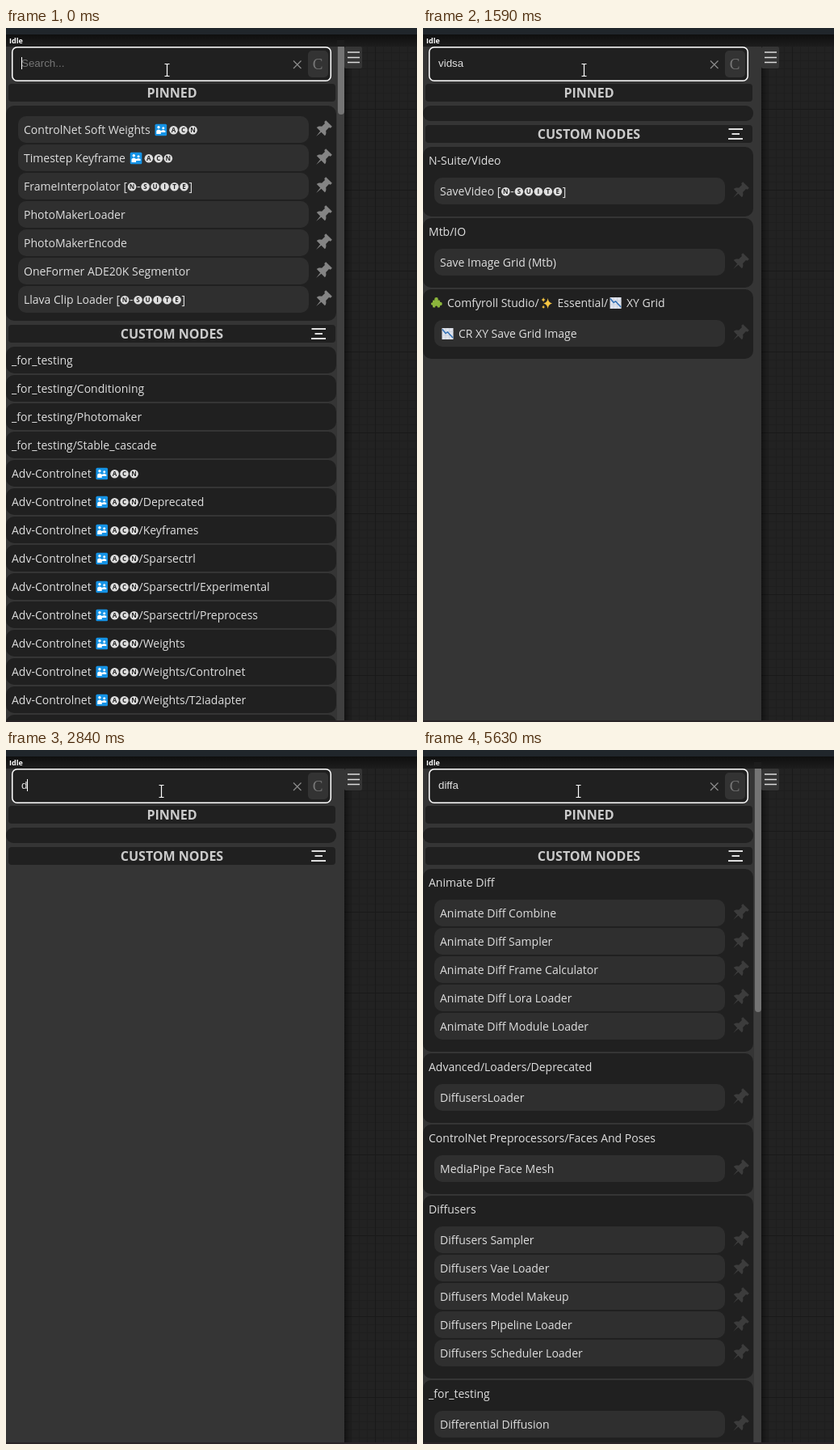
An HTML page that plays this animation: 509x858 px, repeating every 5700 ms.

```html
<!DOCTYPE html>
<html lang="en">
<head>
<meta charset="utf-8">
<title>Node search</title>
<style>
  html, body { margin: 0; width: 100%; height: 100%; overflow: hidden; background: #222; }
  svg { display: block; width: 509px; height: 858px; }
  text { white-space: pre; }
  .label { font: 14px "Open Sans", sans-serif; fill: #dedede; }
  .title { font: bold 16px "Open Sans", sans-serif; fill: #cbcbcb; text-anchor: middle; }
  .query { font: 13.333px "Liberation Sans", Arial, sans-serif; }
  .badge { font: bold 8px "Open Sans", sans-serif; fill: #222; text-anchor: middle; }
</style>
</head>
<body>
<svg viewBox="0 0 509 858">
  <defs>
    <pattern id="minor" x="7" width="10" height="10" patternUnits="userSpaceOnUse">
      <path d="M.5 0V10M0 .5H10" stroke="#1e1e1e"/>
    </pattern>
    <pattern id="major" x="57" width="100" height="100" patternUnits="userSpaceOnUse">
      <path d="M.5 0V100M0 .5H100" stroke="#191919"/>
    </pattern>
    <linearGradient id="bar" x2="0" y2="1">
      <stop stop-color="#0f0f0f"/><stop offset="1" stop-color="#1d1d1d"/>
    </linearGradient>
    <linearGradient id="shade">
      <stop stop-color="#000" stop-opacity=".45"/><stop offset="1" stop-color="#000" stop-opacity="0"/>
    </linearGradient>
    <path id="pin" transform="rotate(45) scale(.9)"
      d="M-6-11H6V-8L4-7V-1C7 1 8 3 8 5H1L0 14-1 5H-8C-8 3-7 1-4-1V-7L-6-8Z"/>
    <g id="passport">
      <rect x="-7.3" y="-7.3" width="14.6" height="14.6" rx="1.5" fill="#1593e6"/>
      <g fill="#fff">
        <circle cx="-2.8" cy="-3.2" r="1.7"/><circle cx="3" cy="-2.2" r="1.5"/>
        <path d="M-5.5 5V1Q-3-2 0 1L3 0 5.5 1V3H0V5Z"/>
      </g>
    </g>
    <g id="puzzle" fill="#8cb63c">
      <rect x="-4.5" y="-3.5" width="9" height="9" rx="1"/>
      <circle cx="0" cy="-4.6" r="2.3"/><circle cx="5" cy="1" r="2.3"/>
      <circle cx="-4.8" cy="1" r="1.8"/>
      <circle cx="0" cy="5" r="1.5" fill="#202020"/>
    </g>
    <g id="sparkle" fill="#f5c542">
      <path d="M1.5-6Q2.3-.3 7 .5 2.3 1.3 1.5 7 .7 1.3-4 .5 .7-.3 1.5-6Z"/>
      <path d="M-4-7Q-3.7-4.3-1.5-4-3.7-3.7-4-1-4.3-3.7-6.5-4-4.3-4.3-4-7ZM-4 2.5Q-3.7 4.5-2 5-3.7 5.3-4 7-4.3 5.3-6 5-4.3 4.5-4 2.5Z"/>
    </g>
    <g id="chart">
      <rect x="-7" y="-7" width="14" height="14" fill="#dfe3ec"/>
      <path d="M-7-2.5H7M-7 2H7M-2.5-7V7M2-7V7" stroke="#c3cad8" stroke-width=".7"/>
      <path d="M-6.5-5.5L-2.5-.5 0-2 6.5 5" fill="none" stroke="#2f6fb5" stroke-width="1.4"/>
    </g>
  </defs>

  <rect width="509" height="858" fill="#222"/>
  <rect x="419" width="90" height="858" fill="url(#minor)"/>
  <rect x="419" width="90" height="858" fill="url(#major)"/>
  <rect x="419" width="10" height="858" fill="url(#shade)"/>
  <rect width="509" height="8" fill="#20262b"/>
  <rect y="8" width="509" height="15" fill="url(#bar)"/>
  <text x="4" y="19" style="font:bold 9px 'Open Sans',sans-serif" fill="#fff">Idle</text>

  <rect y="23" width="419" height="835" fill="#353535"/>
  <rect x="419" y="23" width="22" height="27" rx="2" fill="#353535"/>
  <path d="M423 30H438M423 36.5H438M423 42.5H438" stroke="#dcdcdc" stroke-width="1.6"/>

  <g id="lists"></g>

  <rect x="7.75" y="23.75" width="394.5" height="41.5" rx="6" fill="#202020" stroke="#fff" stroke-width="1.5"/>
  <text id="query" class="query" x="19" y="48"></text>
  <rect id="caret" y="36" width="1" height="15" fill="#fff"/>
  <path d="M356 40.5L365.5 50M365.5 40.5L356 50" stroke="#8c8c8c" stroke-width="1.2"/>
  <rect x="374" y="28" width="25" height="33" rx="5" fill="#333"/>
  <text x="386" y="51" text-anchor="middle" font-family="Liberation Serif, serif" font-size="19" fill="#777">C</text>
  <rect y="856" width="509" height="2" fill="#2a2427"/>
  <path id="mouse" d="M-3-7.5H-1Q0-7.5 0-6.5 0-7.5 1-7.5H3M0-6.5V6.5M-3 7.5H-1Q0 7.5 0 6.5 0 7.5 1 7.5H3" fill="none" stroke="#fff" stroke-width="1.2"/>
</svg>
<script>
const $ = id => document.getElementById(id);
const pen = document.createElement('canvas').getContext('2d');
const measure = (s, font) => { pen.font = font; return pen.measureText(s).width; };
const LABEL = '14px "Open Sans", sans-serif';
const QUERY = '13.333px "Liberation Sans", Arial, sans-serif';
const ICONS = { '@': 'passport', '#': 'puzzle', '*': 'sparkle', '%': 'chart' };

const box = (x, y, w, h, fill, r = 10) =>
  `<rect x="${x}" y="${y}" width="${w}" height="${h}" rx="${r}" fill="${fill}"/>`;

// Icons are written as @ # * %, and {ABC} gives letters in discs.
function label(str, x, y) {
  let out = '';
  for (const part of str.split(/([@#*%]|\{\w+\})/)) {
    if (ICONS[part]) {
      out += `<use href="#${ICONS[part]}" x="${x + 9.5}" y="${y - 5}"/>`;
      x += 19.3;
    } else if (part[0] === '{') {
      for (const c of part.slice(1, -1)) {
        out += `<circle cx="${x + 6}" cy="${y - 4.7}" r="5.3" fill="#dedede"/>` +
          `<text class="badge" x="${x + 6}" y="${y - 1.8}">${c}</text>`;
        x += 12;
      }
    } else if (part) {
      out += `<text class="label" x="${x}" y="${y}">${part}</text>`;
      x += measure(part, LABEL);
    }
  }
  return out;
}

const node = (name, x, y, pin) =>
  box(x, y, 360, 33, '#2f2f2f') + label(name, x + 7, y + 22) +
  `<use href="#pin" x="393" y="${y + 16}" fill="${pin}"/>`;

const title = (name, y) =>
  box(3, y, 405, 22, '#202020', 4) + `<text class="title" x="205.5" y="${y + 17}">${name}</text>`;

const customTitle = y => title('CUSTOM NODES', y) +
  `<path d="M378.5 ${y + 5}H396M382.5 ${y + 11}H392M378 ${y + 17}H396" stroke="#dedede" stroke-width="1.8"/>`;

const scrollbar = h => box(410, 23, 9, 835, '#3f3f3f', 0) + box(411, 15, 8, h + 8, '#747474', 4) +
  box(410, 15, 9, 8, '#1c1c1c', 0);

function home() {
  const pinned = ['ControlNet Soft Weights @{ACN}', 'Timestep Keyframe @{ACN}',
    'FrameInterpolator [{N}-{SUITE}]', 'PhotoMakerLoader', 'PhotoMakerEncode',
    'OneFormer ADE20K Segmentor', 'Llava Clip Loader [{N}-{SUITE}]'];
  const testing = ['', '/Conditioning', '/Photomaker', '/Stable_cascade'];
  const adv = ['', '/Deprecated', '/Keyframes', '/Sparsectrl', '/Sparsectrl/Experimental',
    '/Sparsectrl/Preprocess', '/Weights', '/Weights/Controlnet', '/Weights/T2iadapter', ''];
  const rows = [...testing.map(s => '_for_testing' + s), ...adv.map(s => 'Adv-Controlnet @{ACN}' + s)];
  return title('PINNED', 69) + box(0, 96, 409, 266, '#202020') +
    pinned.map((s, i) => node(s, 15, 109 + 35 * i, '#848484')).join('') +
    customTitle(367) +
    rows.map((s, i) => box(0, 394 + 35 * i, 409, 33, '#202020') + label(s, 7, 416 + 35 * i)).join('') +
    scrollbar(84);
}

function results(groups, thumb) {
  let out = title('PINNED', 69) + box(0, 96, 409, 19, '#202020', 9) + customTitle(120), y = 147;
  for (const [name, ...nodes] of groups) {
    const h = 51 + 35 * nodes.length;
    out += box(0, y, 409, h, '#202020') + label(name, 7, y + 22) +
      nodes.map((s, i) => node(s, 14, y + 38 + 35 * i, '#3c3c3c')).join('');
    y += h + 2;
  }
  return out + (thumb ? scrollbar(thumb) : '');
}

const loadVideo = ['Animate Diff/Utils', 'Load Video'];
const dump = ['WAS Suite/Animation', 'Video Dump Frames'];
const saveVideo = ['N-Suite/Video', 'SaveVideo [{N}-{SUITE}]'];
const mtb = ['Mtb/IO', 'Save Image Grid (Mtb)'];
const loader = ['Advanced/Loaders/Deprecated', 'DiffusersLoader'];
const diffusers = ['Diffusers', 'Diffusers Sampler', 'Diffusers Vae Loader', 'Diffusers Model Makeup'];
const animate = ['Animate Diff', 'Animate Diff Combine', 'Animate Diff Sampler'];
const testing = ['_for_testing', 'Differential Diffusion'];
const dif = [loader, diffusers, animate, testing,
  ['Comfy3D/Import|Export', 'Load Diffusers Pipeline'],
  ['WAS Suite/Loaders/Advanced', 'Diffusers Model Loader']];

const views = {
  '': home(),
  v: results([]),
  vi: results([loadVideo]),
  vid: results([loadVideo,
    ['Sampling/Video_models', 'VideoLinearCFGGuidance', 'VideoTriangleCFGGuidance'],
    ['WAS Suite/Animation/Writer', 'Write To Video'], dump]),
  vids: results([dump, saveVideo, mtb]),
  vidsa: results([saveVideo, mtb,
    ['# Comfyroll Studio/* Essential/% XY Grid', '% CR XY Save Grid Image']]),
  d: results([]),
  di: results([loader]),
  dif: results(dif),
  diff: results(dif),
  diffa: results([
    [...animate, 'Animate Diff Frame Calculator', 'Animate Diff Lora Loader', 'Animate Diff Module Loader'],
    loader,
    ['ControlNet Preprocessors/Faces And Poses', 'MediaPipe Face Mesh'],
    [...diffusers, 'Diffusers Pipeline Loader', 'Diffusers Scheduler Loader'],
    testing], 301)
};

// time, query, caret visible
const steps = [
  [0, '', 1], [130, 'v', 1], [330, 'vi', 1], [530, 'vid', 1], [790, 'vids', 1],
  [1060, 'vidsa', 1], [1590, 'vidsa', 0], [1720, 'vids', 1], [2310, 'vid', 0],
  [2380, 'vi', 1], [2510, '', 1], [2840, 'd', 1], [3310, 'd', 0], [3570, 'di', 1],
  [3770, 'dif', 1], [3970, 'diff', 1], [4100, 'diffa', 1], [4640, 'diffa', 0],
  [5170, 'diffa', 1], [5630, 'diffa', 0]
];
const LOOP = 5700;
let shown = null;

function draw(t) {
  const [, query, caret] = steps.findLast(s => s[0] <= t);
  if (query !== shown) {
    shown = query;
    $('lists').innerHTML = views[query];
    $('query').textContent = query || 'Search...';
    $('query').setAttribute('fill', query ? '#e0e0e0' : '#757575');
    $('caret').setAttribute('x', 19 + Math.max(0, Math.floor(measure(query, QUERY) - .3)));
  }
  $('caret').setAttribute('opacity', caret);
  const pos = t < 1790 ? '199.5 52' : t < 1920 ? '196.5 51' : '192.5 51';
  $('mouse').setAttribute('transform', `translate(${pos})`);
}

const start = performance.now();
function tick() {
  draw((performance.now() - start) % LOOP);
  requestAnimationFrame(tick);
}
tick();
</script>
</body>
</html>
```
